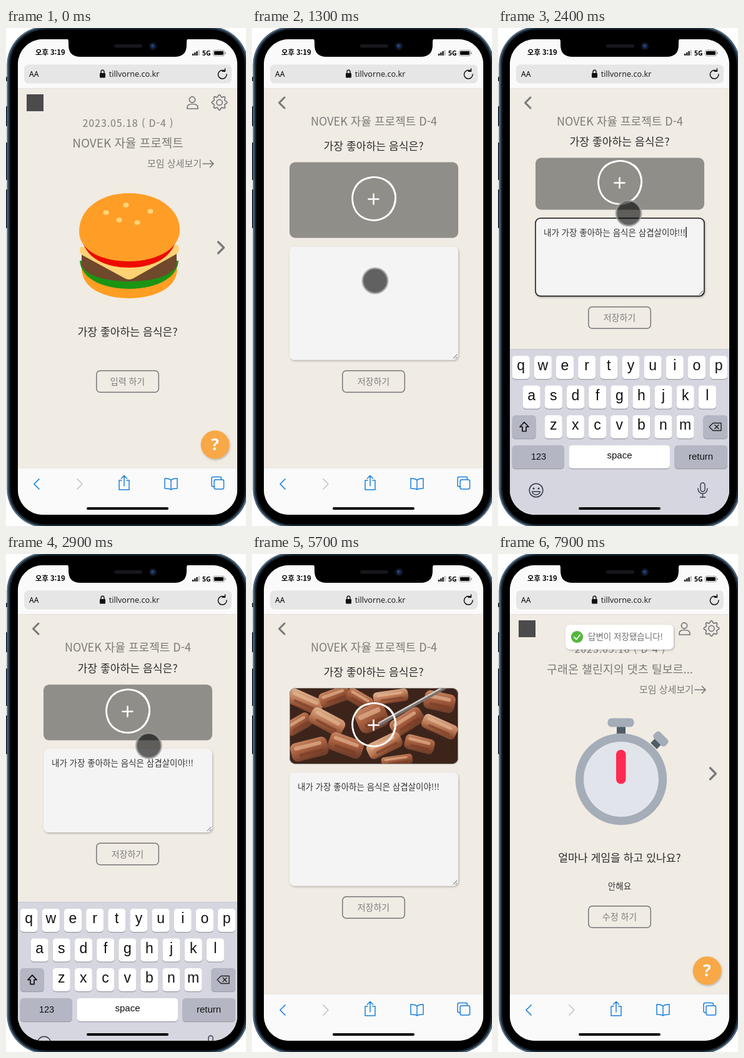
An HTML page for the animation above (8000 ms loop, 384 by 796 pixels).

```html
<!DOCTYPE html>
<html lang="ko">
<head>
<meta charset="utf-8">
<title>질문에 답하기</title>
<style>
  html, body { margin: 0; width: 100%; height: 100%; overflow: hidden; background: #fff; }
  svg { display: block; }
  text { font-family: "Noto Sans CJK KR", "Noto Sans KR", "Noto Sans CJK JP", sans-serif; white-space: pre; }
  .thin { font-weight: 300; fill: #7d7b78; }
  .note { font-weight: 300; fill: #333; font-size: 13.5px; }
  .ask { font-weight: 500; fill: #2b2b2b; font-size: 17.2px; }
  .btn { font-weight: 500; fill: #7d7d7d; font-size: 14px; }
  .latin { font-family: "Noto Sans", "Open Sans", sans-serif; }
  .key { font-family: "Liberation Sans", Arial, sans-serif; fill: #111; }
  .line { fill: none; stroke-linecap: round; stroke-linejoin: round; }
  .mid { text-anchor: middle; }
</style>
</head>
<body>
<svg id="stage" width="384" height="796" viewBox="0 0 384 796"></svg>
<script>
const LOOP = 8000;
const ANSWER = "내가 가장 좋아하는 음식은 삼겹살이야!!!";
const GREY = "#777779", BLUE = "#1b7fdc";

const rect = (x, y, w, h, r, fill, more = "") =>
  `<rect x="${x}" y="${y}" width="${w}" height="${h}" rx="${r}" fill="${fill}" ${more}/>`;
const circle = (x, y, r, fill, more = "") =>
  `<circle cx="${x}" cy="${y}" r="${r}" fill="${fill}" ${more}/>`;
const line = (d, color, width, more = "") =>
  `<path class="line" d="${d}" stroke="${color}" stroke-width="${width}" ${more}/>`;
const text = (x, y, cls, str, size, more = "") =>
  `<text x="${x}" y="${y}" class="${cls}" ${size ? `style="font-size:${size}px"` : ""} ${more}>${str}</text>`;
const group = (id, body) => `<g id="${id}">${body}</g>`;

const button = (y, label) =>
  rect(144.8, y + .8, 99.5, 34.5, 6, "none", `stroke="${GREY}" stroke-width="1.5"`) +
  text(194.5, y + 23, "btn mid", label);

function phoneBody() {
  const sideKeys = [[78, 7], [125, 32], [183, 60], [258, 62]]
    .map(([y, h]) => rect(0, y, 4, h, 1, "#22303c")).join("");
  return sideKeys +
    rect(1.5, -2.5, 386, 801, 62, "#1d2a36") +
    rect(3, -1, 383, 798, 60, "none", `stroke="#4d6a82" stroke-width="2"`) +
    rect(6.5, 2, 376, 792, 57, "#000", `stroke="#16202a"`);
}

function browserTop() {
  const bars = [3, 5, 7, 9].map((h, i) =>
    rect(298 + i * 3.2, 44 - h, 2.3, h, .5, i < 3 ? "#111" : "#bbb")).join("");
  return rect(19, 18, 351, 79, 0, "#fafafa") + rect(19, 96, 351, 1, 0, "#e4e3e1") +
    text(47, 43, "", "오후 3:19", 11.3, `font-weight="700"`) + bars +
    text(314, 44, "latin", "5G", 10.5, `font-weight="700"`) +
    rect(331.5, 35.5, 18, 9, 2.5, "none", `stroke="#999"`) +
    rect(333, 37, 15, 6, 1, "#000") + rect(350.5, 38.5, 1.3, 3, .6, "#777") +
    rect(29, 58.5, 332, 30, 7, "#e6e6e6") +
    text(37, 78, "latin", "AA", 12) +
    rect(150, 72, 9, 7.5, 1.2, "#111") + line("M152 72v-2a2.5 2.8 0 0 1 5 0v2", "#111", 1.4) +
    text(205, 78, "latin mid", "tillvorne.co.kr", 12.6, `fill="#222"`) +
    line("M350 68.6a6.8 6.8 0 1 0 3 5.4M350.5 65v4.2h-4.4", "#111", 1.5);
}

function browserBottom() {
  return rect(19, 703, 351, 76, 0, "#fafafa") + rect(19, 703, 351, 1, 0, "#e9e8e6") +
    line("M53 721l-8 8 8 8", BLUE, 1.7) + line("M114 721l8 8-8 8", "#c4c4c6", 1.7) +
    line("M185 723h-4v15h16v-15h-4M189 732v-16M184.5 720l4.5-4.5 4.5 4.5", BLUE, 1.5) +
    line("M264 723c-2-3-6-3-10-3v16c4 0 8 0 10 2 2-2 6-2 10-2v-16c-4 0-8 0-10 3zv15", BLUE, 1.5) +
    rect(333, 722, 15.5, 15, 2.5, "none", `stroke="${BLUE}" stroke-width="1.5"`) +
    line("M333 733h-1.5q-2.5 0-2.5-2.5v-10.5q0-2.5 2.5-2.5h10.5q2.5 0 2.5 2.5v2", BLUE, 1.5);
}

const notch = "M96 17q4 0 4 5v5q0 19 19 19h151q19 0 19-19v-5q0-5 4-5z";

function homeShell() {
  const gear = Array.from({ length: 49 }, (_, i) => {
    const a = i * Math.PI / 24, r = 10.6 + 1.7 * Math.cos(8 * a);
    return `${i ? "L" : "M"}${(341.5 + r * Math.sin(a)).toFixed(1)} ${(119 - r * Math.cos(a)).toFixed(1)}`;
  }).join("");
  return rect(33, 106, 27, 27, 0, "#4b4b4b") +
    circle(298, 114.5, 4.6, "none", `stroke="${GREY}" stroke-width="1.7"`) +
    line("M290 129v-2c0-4 3-5.5 8-5.5s9 1.5 9 5.5v2z", GREY, 1.7) +
    line(gear, GREY, 1.7) + circle(341.5, 119, 4.6, "none", `stroke="${GREY}" stroke-width="1.7"`) +
    text(195.5, 158, "thin mid", "2023.05.18 ( D-4 )", 16, `letter-spacing=".9"`) +
    text(226, 222, "thin", "모임 상세보기", 15) +
    line("M315 217h17M326.5 211.5l5.5 5.5-5.5 5.5", GREY, 1.7) +
    line("M339.5 342l9 9-9 9", GREY, 3.2) +
    circle(334.5, 666, 22.8, "#f8a847", `filter="url(#soft)"`) +
    text(334.5, 675, "latin mid", "?", 27, `fill="#fff" font-weight="700"`);
}

function burger() {
  const seeds = [[160, 295], [192, 283], [231, 293], [181, 307], [210, 311]]
    .map(([x, y]) => `<ellipse cx="${x}" cy="${y}" rx="4.5" ry="3.7" fill="#ffd479"/>`).join("");
  return `<path d="M121 385C122 417 158 432 197 432S273 417 274 385z" fill="#ff9e22"/>
    <path d="M118 372C120 403 160 417 197 417S274 403 276 372z" fill="#1b9414"/>
    <path d="M121 358V380C130 398 165 405 197 405S264 398 273 380V358z" fill="#70482c"/>
    <path d="M119 350Q116 359 122 363L190 400Q197 404 204 400L273 361Q279 357 275 347z" fill="#ffd273"/>
    <path d="M122 340C130 370 162 383 197 383S263 370 272 340z" fill="#ee0a00"/>
    <path d="M117 327C116 290 150 264 197 264S279 290 278 324C277 354 240 373 197 373S119 357 117 327z" fill="#ff9e27"/>` + seeds;
}

function stopwatch() {
  return rect(190, 274, 14, 16, 0, "#4f5b66") + rect(175.5, 262.5, 42, 14, 6, "#a4adb8") +
    `<g transform="translate(259 297) rotate(45)">` +
    rect(-7, 0, 14, 14, 0, "#4f5b66") + rect(-13, -9, 26, 14, 5, "#a4adb8") + `</g>` +
    circle(197, 360, 73.2, "#a4adb8") + circle(197, 360, 60, "#e1e5eb") +
    rect(189, 313, 15.5, 54.5, 7.5, "#ff2a50");
}

function homePage(title, size, art, ask) {
  return homeShell() + text(195, 191, "thin mid", title, size) + art + text(194.5, 492, "ask mid", ask);
}

const homeBefore = homePage("NOVEK 자율 프로젝트", 19, burger(), "가장 좋아하는 음식은?") +
  button(547, "입력 하기");
const homeAfter = homePage("구래온 챌린지의 댓츠 틸보르...", 18.4, stopwatch(), "얼마나 게임을 하고 있나요?") +
  text(194.5, 536, "note mid", "안해요") + button(562, "수정 하기");

function toast() {
  return rect(108, 113, 173, 39.5, 7, "#fff", `filter="url(#soft)"`) +
    circle(126.5, 132.5, 9.6, "#55b63c") + line("M122 133l3.5 3.5 5.5-7", "#e9f7e4", 2) +
    text(144, 137, "", "답변이 저장됐습니다!", 13.5, `fill="#707070"`);
}

function photo() {
  // x, y, width, height, tilt of each piece
  const pieces = [
    [85, 236, 58, 26, 24], [132, 228, 50, 24, -20], [172, 232, 44, 22, 30], [222, 228, 56, 20, -8],
    [300, 236, 50, 30, 12], [74, 272, 44, 24, -30], [120, 268, 58, 28, 28], [192, 262, 50, 40, -24],
    [248, 268, 56, 28, -32], [300, 276, 58, 24, 24], [92, 312, 60, 30, -14], [150, 306, 56, 30, 20],
    [212, 306, 58, 26, -26], [268, 304, 48, 24, 14], [232, 330, 50, 16, -8]];
  const meat = pieces.map(([x, y, w, h, a], i) =>
    `<g transform="translate(${x} ${y}) rotate(${a})">` +
    rect(-w / 2, -h / 2, w, h, h * .3, i % 3 ? "url(#meat)" : "url(#fat)") +
    rect(-w * .4, -h * .3, w * .75, h * .2, 3, "#e6b895", `opacity=".65"`) +
    rect(-w * .3, h * .12, w * .65, h * .16, 2, "#7a3a22", `opacity=".6"`) + `</g>`).join("");
  return `<g clip-path="url(#card)">` + rect(60, 214, 270, 122, 0, "#3d241b") + meat +
    line("M318 208L204 272", "#77706c", 6) + line("M316 207L203 270", "#d2ccc7", 2.5) + `</g>` +
    rect(60.5, 214.5, 269, 121, 9, "none", `stroke="#8f8e89"`);
}

function keyboard() {
  const key = (x, y, w, fill) => rect(x, y + 1.2, w, 37, 5, "#9a9ca6") + rect(x, y, w, 37, 5, fill);
  const row = (letters, x0, y) => [...letters].map((c, i) => {
    const x = x0 + i * 35.15;
    return key(x, y, 28, "#fff") + text(x + 14, y + 23, "key mid", c, 23);
  }).join("");
  const dim = "#b4b6c3", ink = "#333a47";
  return rect(19, 513, 351, 266, 0, "#d5d6df") + rect(19, 513, 351, 1, 0, "#c7c8d0") +
    row("qwertyuiop", 22.7, 524) + row("asdfghjkl", 39.7, 571.5) + row("zxcvbnm", 74.7, 619) +
    key(22.7, 619, 38, dim) + key(328.5, 619, 38.5, dim) +
    line("M42 630l-7 7.5h4v7h6v-7h4z", "#111", 1.7) +
    line("M344 631.5h13v12h-13l-6-6zM347 634.5l6 6M353 634.5l-6 6", "#222", 1.4) +
    key(22.7, 667, 83, dim) + key(113.5, 667, 161.5, "#fff") + key(282.5, 667, 84.5, dim) +
    text(65, 690, "key mid", "123", 14.5) + text(194.5, 688, "key mid", "space", 15) +
    text(324.5, 690, "key mid", "return", 15) +
    circle(61, 739, 10.8, "none", `stroke="${ink}" stroke-width="1.5"`) +
    circle(57, 736, 1.6, ink) + circle(65, 736, 1.6, ink) +
    line("M54.5 741h13q-1.5 5-6.5 5t-6.5-5z", ink, 1.3) +
    rect(324, 727, 7, 14, 3.5, "none", `stroke="${ink}" stroke-width="1.4"`) +
    line("M320 736c0 11 15 11 15 0M327.5 744v6M323.5 750h8", ink, 1.4);
}

function editPage() {
  return line("M52 111l-8.5 8.5 8.5 8.5", GREY, 3) +
    text(195, 156, "thin mid", "NOVEK 자율 프로젝트 D-4", 18) +
    text(194.5, 195, "ask mid", "가장 좋아하는 음식은?", 0, `id="ask"`) +
    rect(60, 214.5, 270, 121, 9, "#8f8e89", `id="slot"`) + group("photo", photo()) +
    group("add",
      line("M190 239C166 242 157 264 162 283C168 305 192 313 212 303C230 293 234 270 225 254C217 240 199 236 184 240", "#fff", 2.8) +
      line("M192 238C212 238 228 252 229 270C229 290 216 305 197 308", "#fff", 1.6) +
      line("M186.5 273.5h16M194.5 265.5v16", "#fff", 2.6)) +
    rect(60, 349.5, 270, 181, 8, "#f4f4f4", `id="area" filter="url(#soft)"`) +
    line("M322 528l6-6M326 528l2-2", "#555", 1, `id="grip"`) +
    text(73, 377, "note", "", 0, `id="typed"`) + rect(0, 0, 1.3, 17, 0, "#000", `id="caret"`) +
    group("save", button(547, "저장하기"));
}

const stage = document.getElementById("stage");
stage.innerHTML = `<defs>
  <clipPath id="screen"><rect x="19" y="18" width="351" height="760" rx="40"/></clipPath>
  <clipPath id="card"><rect x="60" y="214.5" width="270" height="121" rx="9"/></clipPath>
  <filter id="soft" x="-20%" y="-20%" width="140%" height="150%">
    <feDropShadow dx="1" dy="1.5" stdDeviation="1.6" flood-opacity=".28"/></filter>
  <linearGradient id="meat" x2=".3" y2="1"><stop stop-color="#c98a66"/><stop offset=".5" stop-color="#a85f3f"/><stop offset="1" stop-color="#74402b"/></linearGradient>
  <linearGradient id="fat" x2=".3" y2="1"><stop stop-color="#e2b693"/><stop offset=".6" stop-color="#bd7a57"/><stop offset="1" stop-color="#85492f"/></linearGradient>
  </defs>` + phoneBody() + `<g clip-path="url(#screen)">` +
  rect(19, 18, 351, 760, 0, "#f0ebe3") + browserTop() +
  group("before", homeBefore) + group("edit", editPage()) + group("after", homeAfter) +
  browserBottom() + group("keys", keyboard()) + group("toast", toast()) +
  rect(129, 766, 131, 4, 2, "#000") +
  circle(0, 0, 20, "rgba(0,0,0,.6)", `id="touch" stroke="#a0a0a0" stroke-opacity=".7" stroke-width="3"`) + `</g>` +
  `<path d="${notch}" fill="#000"/>` + rect(173, 26, 45, 5.5, 2.7, "#17181c") +
  circle(235, 29, 6.2, "#101421") + circle(235, 29, 3.4, "#17305c") + circle(234, 28, 1.2, "#3d629c");

const el = {};
stage.querySelectorAll("[id]").forEach(n => el[n.id] = n);

const clamp = v => Math.max(0, Math.min(1, v));
const smooth = v => v * v * (3 - 2 * v);
const ramp = (t, a, b) => smooth(clamp((t - a) / (b - a)));
const mix = (a, b, k) => a + (b - a) * k;
const show = (node, on) => node.setAttribute("visibility", on ? "inherit" : "hidden");
const shift = (node, y) => node.setAttribute("transform", `translate(0 ${y})`);
const set = (node, attrs) => { for (const k in attrs) node.setAttribute(k, attrs[k]); };

// Touch paths as [time, x, y]
const paths = [
  [[200, 392, 393], [650, 197, 566], [900, 197, 566], [1200, 197, 404], [1900, 197, 404],
    [2300, 209, 296], [2800, 209, 296], [3300, 392, 393]],
  [[3900, 241, 800], [4450, 195, 273], [4800, 195, 273]],
  [[6000, 392, 393], [6500, 210, 569], [7150, 210, 569], [7650, 392, 393]]];

function touchAt(t) {
  const path = paths.find(p => t >= p[0][0] && t < p[p.length - 1][0]);
  if (!path) return null;
  const i = path.findIndex(p => p[0] > t);
  const [a, b] = [path[i - 1], path[i]], k = ramp(t, a[0], b[0]);
  return [mix(a[1], b[1], k), mix(a[2], b[2], k)];
}

function draw(t) {
  const home = t < 900, done = t >= 7250, editing = !home && !done;
  show(el.before, home);
  show(el.edit, editing);
  show(el.after, done);

  const k = ramp(t, 1400, 1600) - ramp(t, 2850, 3050);
  show(el.keys, k > 0);
  shift(el.keys, (1 - k) * 266);
  shift(el.ask, -7 * k);
  set(el.slot, { y: mix(214.5, 207.5, k), height: mix(121, 83, k) });
  shift(el.add, -26 * k);
  const focused = t >= 1350 && t < 2850;
  const top = mix(349.5, 304, k), bottom = mix(530.5, 428.5, k);
  set(el.area, { y: top, height: bottom - top, stroke: focused ? "#111" : "none", "stroke-width": 1.5 });
  shift(el.grip, bottom - 530.5);
  shift(el.save, -102 * k);
  show(el.photo, t >= 5700);

  const count = Math.round(clamp((t - 1600) / 700) * ANSWER.length);
  el.typed.textContent = ANSWER.slice(0, count);
  shift(el.typed, top - 349.5);
  const width = count ? el.typed.getComputedTextLength() : 0;
  set(el.caret, { x: 73.5 + width, y: top + 14 });
  show(el.caret, focused && (t < 2300 || t % 1000 < 800));

  show(el.toast, done);
  shift(el.toast, -60 * (1 - ramp(t, 7250, 7450)));
  el.toast.setAttribute("opacity", ramp(t, 7250, 7400));

  const p = touchAt(t);
  show(el.touch, p);
  if (p) set(el.touch, { cx: p[0], cy: p[1] });
}

const start = performance.now();
function tick() {
  draw((performance.now() - start) % LOOP);
  requestAnimationFrame(tick);
}
tick();
</script>
</body>
</html>
```
